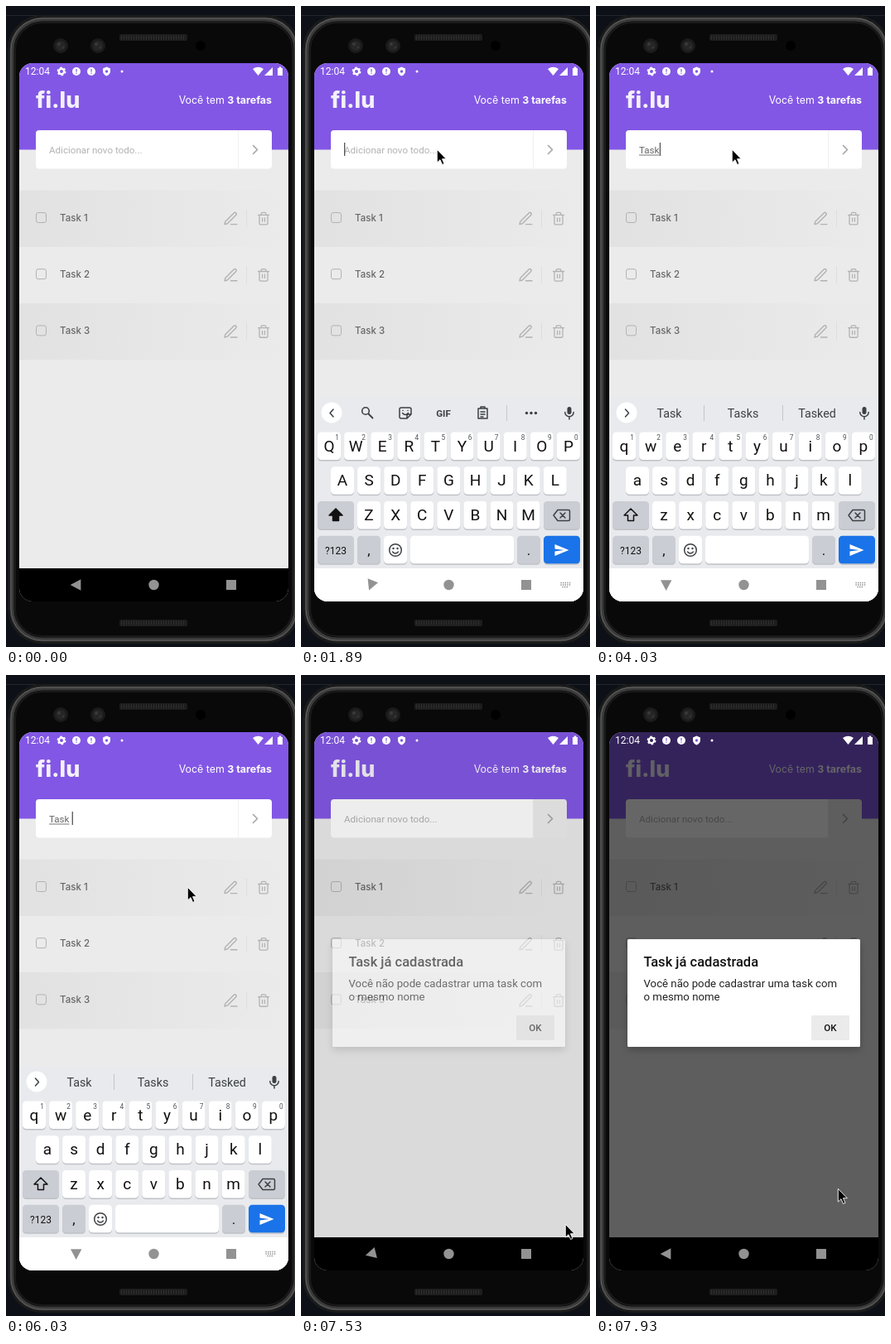
Write an HTML page that moves like this. It is 349x774 px and loops after 8 s.

```html
<!DOCTYPE html>
<html lang="pt">
<head>
<meta charset="utf-8">
<style>
html, body { margin: 0; width: 100%; height: 100%; overflow: hidden; background: #0d1117; }
svg { display: block; width: 100vw; height: 100vh; }
text { white-space: pre; font-family: Roboto, sans-serif; }
.i { font-family: Inter, sans-serif; }
.m { text-anchor: middle; }
.l { fill: none; stroke-linecap: round; stroke-linejoin: round; }
</style>
</head>
<body>
<svg id="stage" viewBox="0 0 349 774"></svg>
<script>
const rect = (x, y, w, h, fill, r = 0, more = '') =>
  `<rect x="${x}" y="${y}" width="${w}" height="${h}" rx="${r}" fill="${fill}" ${more}/>`;
const circle = (x, y, r, fill, more = '') => `<circle cx="${x}" cy="${y}" r="${r}" fill="${fill}" ${more}/>`;
const text = (x, y, size, fill, str, more = '') =>
  `<text x="${x}" y="${y}" font-size="${size}" fill="${fill}" ${more}>${str}</text>`;
const mid = (x, y, size, fill, str, more = '') => text(x, y, size, fill, str, `class="m" ${more}`);
const line = (d, color, w = 1.3, more = '') => `<path class="l" d="${d}" stroke="${color}" stroke-width="${w}" ${more}/>`;
const shape = (d, fill, more = '') => `<path d="${d}" fill="${fill}" ${more}/>`;
const group = (id, body, more = '') => `<g id="${id}" ${more}>${body}</g>`;

const INK = '#3c4043', KEY = '#111', SOFT = '#b2b2b2';

function phone() {
  const speaker = y => rect(137, y, 82, 8, '#1d1d1d', 2) +
    line(`M139 ${y + 4}H217`, '#303030', 5, 'stroke-dasharray="1 2" style="stroke-linecap:butt"');
  const lens = x => circle(x, 48, 9, '#1b1b1b') + circle(x, 48, 6, '#262626') +
    circle(x - 2, 46, 2, '#3a3a3a') + circle(x + 3, 50, 1.5, '#343434');
  // concentric outlines of the metal rim
  const rim = (inset, color, w) => rect(inset, inset + 9, 357 - 2 * inset, 763 - 2 * inset, 'none', 44 - inset,
    `stroke="${color}" stroke-width="${w}"`);
  return rect(0, 0, 349, 774, '#0d1117') + rect(0, 11, 349, 1, '#22272e') +
    rect(2, 11, 353, 759, '#090909', 42) +
    rim(3, '#1c1c1c', 2) + rim(7, '#3a3a3a', 5) + rim(6, '#626262', 1) + rim(11, '#1a1a1a', 2) +
    lens(66) + lens(111) + circle(235, 48, 6, '#000') + speaker(34) + speaker(741);
}

function task(n) {
  const y = (n - 1) * 68.2;
  return `<g transform="translate(0 ${y})">` +
    (n % 2 ? rect(16, 222.5, 325, 68.4, 'url(#fade)') : '') +
    rect(36.5, 249.5, 12, 12, 'none', 2.5, `stroke="${SOFT}"`) +
    text(65, 259.5, 11.5, '#666', 'Task ' + n, 'class="i" font-weight="500"') +
    line('M12 20h9M16.5 3.5a2.12 2.12 0 0 1 3 3L7 19l-4 1 1-4Z', SOFT, 1.7, 'transform="translate(261.5 247) scale(.83)"') +
    rect(290, 246, 1, 21, '#c4c4c4', 0, 'opacity=".3"') +
    line('M3 6h18M19 6v14a2 2 0 0 1-2 2H7a2 2 0 0 1-2-2V6M8 6V4a2 2 0 0 1 2-2h4a2 2 0 0 1 2 2v2M10 11v6M14 11v6',
      SOFT, 1.8, 'transform="translate(302.4 248) scale(.72)"') + '</g>';
}

function app() {
  return rect(16, 69, 325, 650, '#ebebeb') + rect(16, 69, 325, 104.5, '#8257e5') +
    text(36, 123, 27, '#f4f1fb', 'fi.lu', 'class="i" font-weight="800"') +
    text(321, 118, 12.4, '#fff', 'Você tem <tspan font-weight="700">3 tarefas</tspan>', 'class="i" text-anchor="end"') +
    rect(36, 150, 285, 46.5, '#fff', 4) + rect(280, 150, 1, 46.5, '#f0f0f0') +
    shape('M281 150h36a4 4 0 0 1 4 4v38.5a4 4 0 0 1-4 4h-36Z', '#000', 'id="press" opacity=".07"') +
    line('M298.5 168.5l5 5-5 5', '#a9a9a9', 1.7) +
    text(52, 178, 11.6, SOFT, 'Adicionar novo todo...', 'id="hint"') +
    text(52, 178, 11.6, '#666', '', 'id="typed"') +
    rect(52, 179.5, 0, 1, '#777', 0, 'id="under"') + rect(52, 165, 1.3, 16, '#555', 0, 'id="caret"') +
    [1, 2, 3].map(task).join('');
}

const key = (x, y, w, fill = '#fff') => rect(x, y + 1, w, 34, '#bfc1c6', 4.5) + rect(x, y, w, 33.5, fill, 4.5);
const rows = [['QWERTYUIOP', 34, 514.5], ['ASDFGHJKL', 50, 556.3], ['ZXCVBNM', 82, 598]];
const eachKey = draw => rows.map(([s, x, y]) => [...s].map((c, i) => draw(c, x + i * 32.1, y)).join('')).join('');

function keyboard() {
  const letters = lower => eachKey((c, x, y) => mid(x, y + 23, 19, KEY, lower ? c.toLowerCase() : c));
  const digits = [...'1234567890'].map((d, i) => mid(43.5 + i * 32.1, 523.5, 8.3, '#4d5156', d)).join('');
  const tools =
    line('M39 487l-4 4.5 4 4.5', INK, 1.5) +
    circle(78, 489, 4.3, 'none', `stroke="${INK}" stroke-width="1.6"`) + line('M81.5 492.5l5 5', INK, 1.8) +
    line('M121 485h10a2 2 0 0 1 2 2v6l-5 5h-7a2 2 0 0 1-2-2v-9a2 2 0 0 1 2-2ZM128 498v-3a2 2 0 0 1 2-2h3M122.5 491.5q3.5 4 7 0M123 488.5v.1M129 488.5v.1', INK, 1.5) +
    mid(172, 495.5, 11.5, INK, 'GIF', 'font-weight="700"') +
    line('M214 486h11v12h-11ZM217 486v-2h5v2M217 490h5M217 493h5M217 496h3', INK, 1.5) +
    rect(248, 482, 1, 19, '#c4c7cb') +
    [272.5, 278, 283.5].map(x => circle(x, 491.5, 1.7, INK)).join('');
  const words = line('M35.5 487l4 4.5-4 4.5', INK, 1.5) +
    group('bars', rect(130, 482, 1, 19, '#c4c7cb') + rect(225, 482, 1, 19, '#c4c7cb')) +
    [88.5, 177.5, 267].map((x, i) => mid(x, 497, 14.3, INK, '', `id="word${i}"`)).join('');
  const GREY = '#cacdd3', LAST = 639.7;
  return rect(16, 473, 325, 206, '#e8eaed') + circle(37, 491, 12.5, '#fff') +
    group('tools', tools) + group('words', words) +
    rect(321.5, 484, 5, 9, INK, 2.5) + line('M318.8 490.5a5.2 5.2 0 0 0 10.4 0M324 496v3', INK, 1.5) +
    eachKey((c, x, y) => key(x - 14, y, 28)) +
    group('upper', letters(false)) + group('lower', letters(true)) + digits +
    key(20, 598, 44, GREY) + key(293, 598, 44, GREY) + key(20, LAST, 44, GREY) + key(68, LAST, 28, GREY) +
    key(100, LAST, 28) + key(132, LAST, 125) + key(261, LAST, 28, GREY) + key(293, LAST, 44, '#1a73e8') +
    line('M42 607l8 8h-4.5v6.5h-7v-6.5H34Z', KEY, 1.5, 'id="shift"') +
    line('M310 608.5h13a1.5 1.5 0 0 1 1.5 1.5v10a1.5 1.5 0 0 1-1.5 1.5h-13l-5-6.5ZM313 612l6 6M319 612l-6 6', INK, 1.5) +
    mid(42, 661.5, 12, KEY, '?123') + mid(82, 663, 17, KEY, ',') + mid(275, 663, 17, KEY, '.') +
    circle(114, 657, 7.3, 'none', `stroke="${INK}" stroke-width="1.5"`) +
    circle(111.5, 655, 1.2, INK) + circle(116.5, 655, 1.2, INK) + line('M110.5 659q3.5 4 7 0', INK) +
    shape('M306.5 650l17 7-17 7v-5.5l11-1.5-11-1.5Z', '#fff');
}

function statusBar() {
  const gear = circle(67, 79, 3.2, 'none', 'stroke="#fff" stroke-width="2.4"') +
    circle(67, 79, 4.7, 'none', 'stroke="#fff" stroke-width="1.5" stroke-dasharray="2.46 2.46"');
  const alert = x => circle(x, 79, 5, '#fff') + rect(x - .6, 76, 1.2, 3.6, '#8257e5') + rect(x - .6, 80.6, 1.2, 1.2, '#8257e5');
  return text(23, 83.3, 12, '#fff', '12:04') + gear + alert(85) + alert(103) +
    shape('M121.5 73.5l4.5 2v3q0 4-4.5 6-4.5-2-4.5-6v-3Z', '#fff') + circle(121.5, 79, 1.7, '#8257e5') +
    circle(140, 79, 1.5, '#fff') + shape('M298 76q6.5-4.5 13 0l-6.5 8Z', '#fff') +
    shape('M322 74v10h-10Z', '#fff') + shape('M328 75h1.7v-1.5h2.6V75h1.7v9h-6Z', '#fff');
}

function dialog() {
  return rect(38, 319, 281, 130, '#fff', 1.5, 'filter="url(#shadow)"') +
    text(57.5, 352, 16.5, '#111', 'Task já cadastrada', 'font-weight="500"') +
    text(57.5, 377, 13.23, '#222', 'Você não pode cadastrar uma task com') +
    text(57.5, 392.5, 13.23, '#222', 'o mesmo nome') +
    rect(260, 411, 46, 30, '#ebebeb', 1) + mid(283, 430.3, 11.6, '#111', 'OK', 'font-weight="500"');
}

const keyIcon = line('M313.5 696.5h12M313.5 699h12M315.5 701.5h8', '#888', 1.3, 'id="keyIcon" stroke-dasharray="1.3 1.3" style="stroke-linecap:butt"');
const NAV = '#929292';
stage.innerHTML = `<defs>
  <linearGradient id="fade"><stop stop-color="#c4c4c4" stop-opacity=".24"/><stop offset="1" stop-color="#c4c4c4" stop-opacity="0"/></linearGradient>
  <clipPath id="screen">${rect(16, 69, 325, 650, '#000', 16)}</clipPath>
  <filter id="shadow"><feDropShadow dx="0" dy="4" stdDeviation="5" flood-opacity=".22"/></filter></defs>` +
  phone() + group('display', app() +
    rect(16, 473, 325, 246, '#fafafa', 0, 'id="blank"') + group('board', keyboard()) +
    rect(16, 679, 325, 40, '#fff', 0, 'id="navLight"') + rect(16, 679, 325, 40, '#000', 0, 'id="navDark"') +
    shape('M-7 0L5.7-6.7V6.7Z', NAV, 'id="back"') + circle(178.5, 699, 6.2, NAV) + rect(266, 693, 12, 12, NAV) + keyIcon +
    rect(16, 69, 325, 610, '#000', 0, 'id="scrim"') + group('dialog', dialog()) + statusBar(), 'clip-path="url(#screen)"') +
  shape('M.3.8V16.6L4 13.2 6.6 19 9 17.9 6.5 12.2H11.3Z', '#000', 'id="pointer" stroke="#fff" stroke-width=".9"');

const $ = id => document.getElementById(id);
const set = (id, name, value) => $(id).setAttribute(name, value);
const show = (id, on) => set(id, 'display', on ? 'inline' : 'none');

// Linear interpolation between [time, ...values] stops.
function tween(stops, t) {
  const i = stops.findIndex(s => s[0] > t);
  if (i === 0) return stops[0].slice(1);
  if (i < 0) return stops.at(-1).slice(1);
  const a = stops[i - 1], b = stops[i], k = (t - a[0]) / (b[0] - a[0]);
  return a.slice(1).map((v, j) => v + (b[j + 1] - v) * k);
}
const latest = (steps, t) => steps.findLast(s => s[0] <= t);

const pointerPath = [[1190, 262, 350], [1520, 164, 172.5], [4820, 164, 172.5], [5170, 219, 255.5], [6430, 219, 255.5],
  [6850, 337, 701], [7120, 330, 685], [7320, 330, 685], [7460, 319, 662.5], [7925, 319, 662.5], [7930, 292, 619.5]];
// drop, keyboard opacity, dark navigation opacity
const boardPath = [[1680, 206, 0, 1], [1750, 139, .5, .7], [1815, 139, .5, .7], [1885, 0, 1, 0],
  [7320, 0, 1, 0], [7450, 206, 0, 1]];
const backPath = [[1820, 0], [1890, -68], [1955, -68], [2030, -90], [7320, -90], [7530, -14], [7585, -14], [7650, 0]];
const popPath = [[7455, 0, 0], [7530, .07, .58], [7585, .07, .58], [7660, .6, 1]];
// typed text and how many of its letters are underlined
const typing = [[0, '', 0], [2690, 'T', 0], [2820, 'T', 1], [3020, 'Ta', 1], [3090, 'Ta', 2], [3360, 'Tas', 3],
  [3630, 'Task', 3], [4030, 'Task', 4], [5030, 'Task ', 4], [6230, 'Task 1', 0], [7320, '', 0]];
const hints = [[0], [3090, 'Ta', 'Take', 'Takes'], [3430, 'Tas', 'Task', 'Taste'], [3700, 'Task', 'Tasks', 'Tasked'],
  [4960, '', '', ''], [5170, 'Task', 'Tasks', 'Tasked'], [5570, '', '', ''], [5700, 'Task', 'Tasks', 'Tasked'],
  [6230, '', '', ''], [6430]];
const caretSteps = [[0, 0], [1600, 1], [2160, 0], [2690, 1], [4490, 0], [4990, 1], [5570, 0], [6030, 1], [6730, 0], [7230, 1], [7320, 0]];

function draw(t) {
  show('pointer', t >= 1190);
  set('pointer', 'transform', `translate(${tween(pointerPath, t)})`);

  const [drop, solid, dark] = tween(boardPath, t);
  const open = t >= 1680 && t < 7450;
  show('blank', open);
  show('board', open);
  show('keyIcon', open);
  set('board', 'transform', `translate(0 ${drop})`);
  set('board', 'opacity', solid);
  set('keyIcon', 'opacity', solid);
  show('navLight', drop === 0);
  set('navDark', 'opacity', dark);
  set('back', 'transform', `translate(84.7 699) rotate(${tween(backPath, t)})`);

  const [, str, marked] = latest(typing, t);
  $('typed').textContent = str;
  show('hint', !str);
  set('under', 'width', marked ? $('typed').getSubStringLength(0, marked) : 0);
  set('caret', 'x', 52 + (str ? $('typed').getComputedTextLength() + .3 : 0));
  show('caret', latest(caretSteps, t)[1]);

  const lower = t >= 2690;
  show('upper', !lower);
  show('lower', lower);
  $('shift').style.fill = lower ? 'none' : KEY;
  const words = latest(hints, t).slice(1);
  show('tools', !words.length);
  show('words', words.length);
  show('bars', words[0] || t >= 6230);
  for (let i = 0; i < 3; i++) $('word' + i).textContent = words[i] || '';

  const [shade, pop] = tween(popPath, t);
  show('press', t >= 7320);
  set('scrim', 'opacity', shade);
  set('dialog', 'opacity', pop);
}

function frame() {
  draw(performance.now() % 8000);
  requestAnimationFrame(frame);
}
frame();
</script>
</body>
</html>
```
